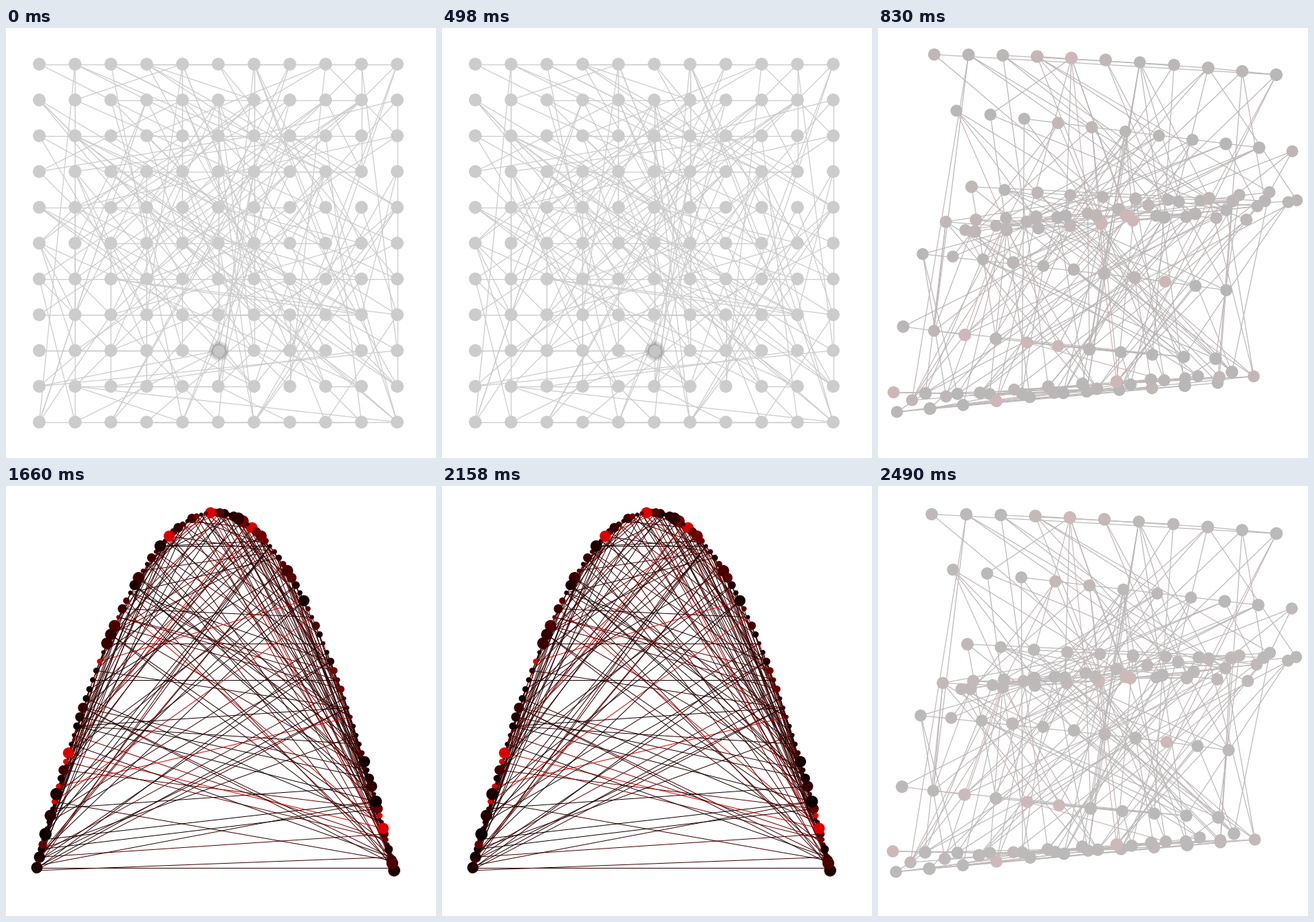
Animation of 625 by 625 pixels, one loop 3.32 s. Source, as a matplotlib script:

```python
import random
import numpy as np
import matplotlib.pyplot as plt
from matplotlib.animation import FuncAnimation
from matplotlib.collections import LineCollection

SIZE, SIDE = 625, 11
COUNT = SIDE * SIDE
PX = 0.72  # points per pixel at 100 dpi
GREY = 0.8
FOCUS = 93
HOT_LARGE = [4, 37, 61, 79, 116]
HOT_SMALL = [38, 74, 81, 82, 88, 102]

rng = random.Random(5)

index = np.arange(COUNT)
theta = 2 * np.pi * index / COUNT
grid = np.column_stack([index % SIDE, index // SIDE]) - SIDE // 2
wave = np.column_stack([np.sin(theta), -np.cos(2 * theta)])

# Radius and red level of each node on the curve
radii = np.array([3 + 6 * rng.random() ** 1.8 for _ in index])
reds = np.array([0.06 + 0.4 * rng.random() ** 2 for _ in index])
radii[HOT_LARGE] = 8
radii[HOT_SMALL] = 4
reds[HOT_LARGE + HOT_SMALL] = 0.86
tints = np.outer(reds, [1, 0, 0])


def random_links():
    """Two links from every node, some of them along its own row."""
    links = set()
    for node in range(COUNT):
        for _ in range(2):
            end = rng.randrange(COUNT)
            if rng.random() < 0.1:
                end = node - node % SIDE + rng.randrange(SIDE)
            in_first_column = node % SIDE == end % SIDE == 0
            if end != node and not in_first_column:
                links.add((node, end))
    return np.array(sorted(links))


links = random_links()

# Each pose: centre, grid step, wave size, colour mix
POSES = [
    ((308.5, 312.7), 52.03, 0, 0),
    ((315.5, 332), 46.75, 59.7, 0.105),
    ((304, 298.7), 0, 260.2, 1),
    ((314.4, 334.4), 47.27, 57.1, 0.094),
]

fig = plt.figure(figsize=(SIZE / 100, SIZE / 100), dpi=100, facecolor="white")
ax = fig.add_axes([0, 0, 1, 1])
ax.set_xlim(0, SIZE)
ax.set_ylim(SIZE, 0)
ax.axis("off")

edges = LineCollection([], zorder=1)
ax.add_collection(edges)


def disc(x, y, radius, **style):
    return ax.scatter(x, y, s=(2 * radius * PX) ** 2, linewidths=0, **style)


dots = disc(np.zeros(COUNT), np.zeros(COUNT), 9, zorder=3)

focus_at = np.array(POSES[0][0]) + POSES[0][1] * grid[FOCUS]
glow = [disc(*focus_at, r, color="#808080", alpha=0.1, zorder=4)
        for r in np.linspace(15, 10, 6)]
glow.append(disc(*focus_at, 8.5, color="#c6c6c6", zorder=5))


def draw(frame):
    centre, step, size, mix = POSES[frame]
    points = np.array(centre) + step * grid + size * wave
    colors = GREY * (1 - mix) + tints * mix
    radius = 9.3 * (1 - mix) + radii * mix

    edges.set_segments(points[links])
    edges.set_color(colors[links[:, 0]])
    edges.set_linewidth((1.25 - 0.25 * mix) * PX)
    dots.set_offsets(points)
    dots.set_facecolor(colors)
    dots.set_sizes((2 * radius * PX) ** 2)
    for ring in glow:
        ring.set_visible(mix == 0)
    return [edges, dots, *glow]


anim = FuncAnimation(fig, draw, frames=len(POSES), interval=830,
                     repeat=True, repeat_delay=0)
plt.show()
```
